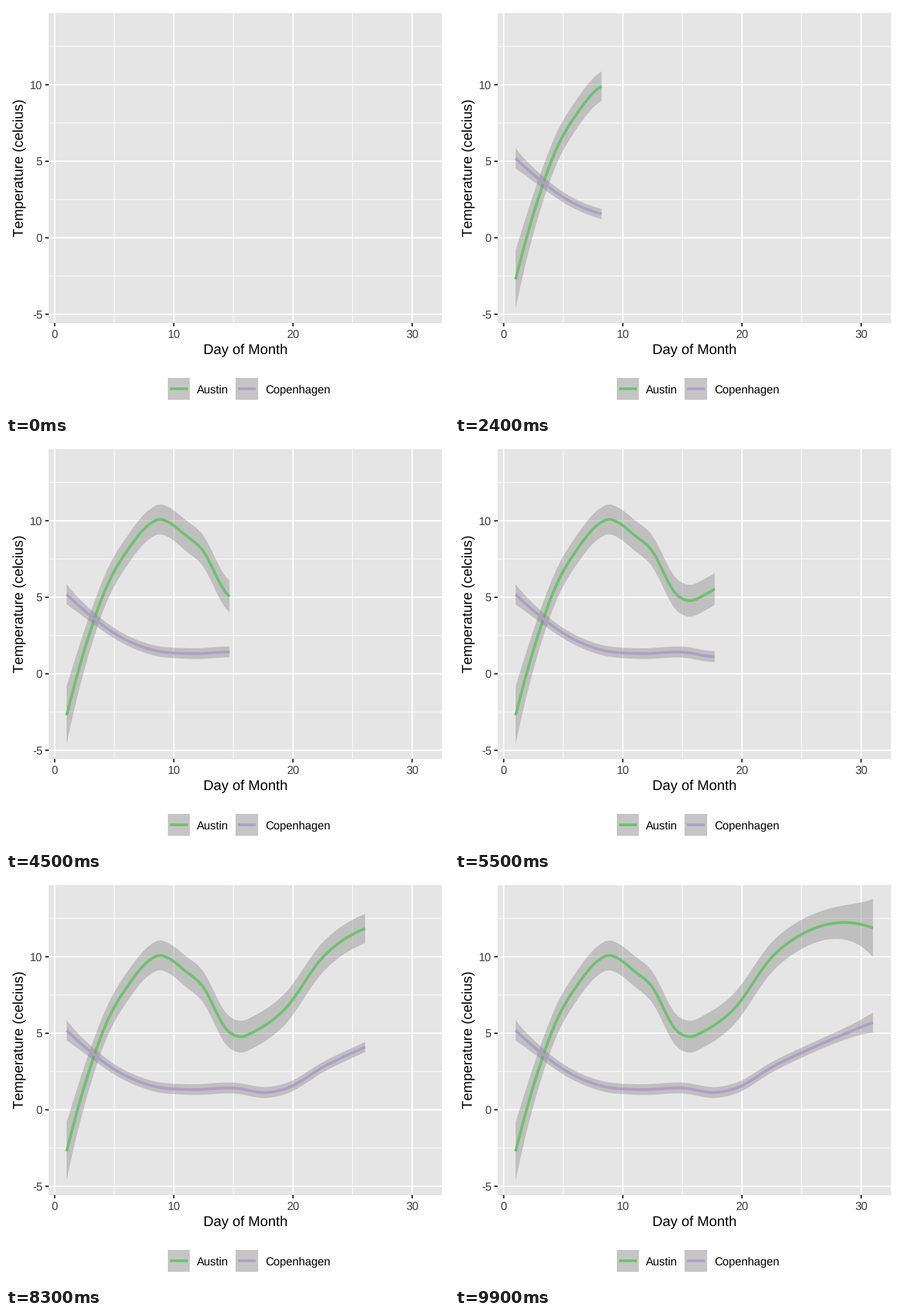
Recreate the animation shown at these times as a matplotlib script. Size 687 px wide and 633 px high, loop 10000 ms.

```python
import numpy as np
import matplotlib.pyplot as plt
from matplotlib.animation import FuncAnimation
from matplotlib.patches import Polygon, Rectangle

W, H, DPI = 687, 633, 128
FRAMES, STEPS = 100, 80
LEFT, RIGHT, TOP, BOTTOM = 66.3, 676, 11, 491.6
LINE_W, MAJOR_W, MINOR_W, TICK, KEY_SIZE = 4.27, 2.13, 1.07, 5.5, 34.56
GREEN, PURPLE = "#6dc26d", "#af9eca"
PANEL, KEY, BAND, TICK_TEXT, TICK_MARK = "#e5e5e5", "#c5c5c5", "#878787", "#3c3c3c", "#262626"

plt.rcParams["font.family"] = "Liberation Sans"
plt.rcParams["text.hinting"] = "none"
plt.rcParams["text.kerning_factor"] = 6  # no pair kerning


def pt(px):
    return px * 72 / DPI


def px_x(day):
    return 75.5 + 18.476 * np.asarray(day)


def px_y(temp):
    return 359.6 - 23.74 * np.asarray(temp)


def smooth(x, points):
    """Cubic Hermite curve through a few (x, y) key points."""
    xs, ys = np.array(points, float).T
    slope = np.gradient(ys, xs, edge_order=2)
    i = np.clip(np.searchsorted(xs, x, side="right") - 1, 0, len(xs) - 2)
    h = xs[i + 1] - xs[i]
    t = (x - xs[i]) / h
    return ((1 + 2 * t) * (1 - t) ** 2 * ys[i] + t * (1 - t) ** 2 * h * slope[i]
            + t * t * (3 - 2 * t) * ys[i + 1] + t * t * (t - 1) * h * slope[i + 1])


def spread(day):
    """Half width of the band: nearly flat, flaring at both ends of the month."""
    u = np.abs(day - 16)
    return 1.04 - .0017 * u ** 2 + 1.24 * np.exp((u - 15) / 1.9)


WARM = [(1, -2.72), (2.6, 1.82), (4.42, 5.8), (6.2, 8.17), (8, 9.8), (8.8, 10.1),
        (9.6, 9.89), (11, 9.04), (12.3, 8.2), (14.6, 5.1), (15.45, 4.78), (17, 5.22),
        (19.2, 6.48), (22.6, 10.05), (26, 11.83), (28.5, 12.24), (31, 11.88)]
COOL = [(1, 5.19), (3.1, 3.74), (5.2, 2.55), (8, 1.6), (11.5, 1.32), (15, 1.42),
        (18, 1.14), (19.5, 1.41), (22.6, 2.82), (26, 4.08), (31, 5.7)]

days = np.linspace(1, 31, STEPS)
arrival = np.rint((FRAMES - 1) * np.arange(STEPS) / (STEPS - 1))

fig = plt.figure(figsize=(W / DPI, H / DPI), dpi=DPI, facecolor="white")
ax = fig.add_axes([0, 0, 1, 1])
ax.set_xlim(0, W)
ax.set_ylim(H, 0)
ax.axis("off")


def rect(x, y, w, h, color):
    ax.add_patch(Rectangle((x, y), w, h, fc=color, lw=0, zorder=0))


def stroke(x, y, color, width, z=1):
    line, = ax.plot(x, y, color=color, lw=pt(width), solid_capstyle="butt",
                    solid_joinstyle="round", snap=False, zorder=z)
    return line


def text(x, y, s, size, color="black", ha="center", **kw):
    ax.text(x, y, s, fontsize=pt(size), color=color, ha=ha, va="baseline", **kw)


def grid(xs, ys, width):
    for x in px_x(xs):
        stroke([x, x], [TOP, BOTTOM], "white", width)
    for y in px_y(ys):
        stroke([LEFT, RIGHT], [y, y], "white", width)


x_ticks, y_ticks = np.arange(0, 31, 10), np.arange(-5, 11, 5)
rect(LEFT, TOP, RIGHT - LEFT, BOTTOM - TOP, PANEL)
grid(x_ticks[:-1] + 5, y_ticks + 2.5, MINOR_W)
grid(x_ticks, y_ticks, MAJOR_W)

for day in x_ticks:
    x = px_x(day)
    stroke([x, x], [BOTTOM, BOTTOM + TICK], TICK_MARK, MAJOR_W)
    text(x, 515, str(day), 17.6, TICK_TEXT)
for temp in y_ticks:
    y = px_y(temp)
    stroke([LEFT - TICK, LEFT], [y, y], TICK_MARK, MAJOR_W)
    text(56.4, y + 6.3, str(temp), 17.6, TICK_TEXT, "right")

text((LEFT + RIGHT) / 2, 540, "Day of Month", 22)
text(27, (TOP + BOTTOM) / 2, "Temperature (celcius)", 22,
     rotation=90, rotation_mode="anchor")

for x, name, color in ((250.9, "Austin", GREEN), (356.2, "Copenhagen", PURPLE)):
    rect(x, 576.6, KEY_SIZE, KEY_SIZE, KEY)
    stroke([x + .1 * KEY_SIZE, x + .9 * KEY_SIZE], [593.9, 593.9], color, LINE_W)
    text(x + KEY_SIZE + 11, 600.7, name, 17.6, ha="left")


class Series:
    def __init__(self, points, scale, color, z):
        self.mid = smooth(days, points)
        self.half = scale * spread(days)
        self.band = Polygon(np.zeros((3, 2)), closed=True, fc=BAND, alpha=.4, lw=0, zorder=z)
        ax.add_patch(self.band)
        self.line = stroke([], [], color, LINE_W, z + 1)

    def reveal(self, frame):
        seen = arrival < frame

        def upto(values):
            return np.append(values[seen], np.interp(frame, arrival, values))

        x, mid, half = px_x(upto(days)), upto(self.mid), upto(self.half)
        self.line.set_data(x, px_y(mid))
        edge = np.r_[px_y(mid + half), px_y(mid - half)[::-1]]
        self.band.set_xy(np.c_[np.r_[x, x[::-1]], edge])


series = [Series(WARM, 1, GREEN, 2), Series(COOL, .345, PURPLE, 4)]


def update(frame):
    for s in series:
        s.reveal(frame)
    return [a for s in series for a in (s.band, s.line)]


anim = FuncAnimation(fig, update, frames=FRAMES, interval=100, repeat=True,
                     repeat_delay=0, blit=False)
plt.show()
```
